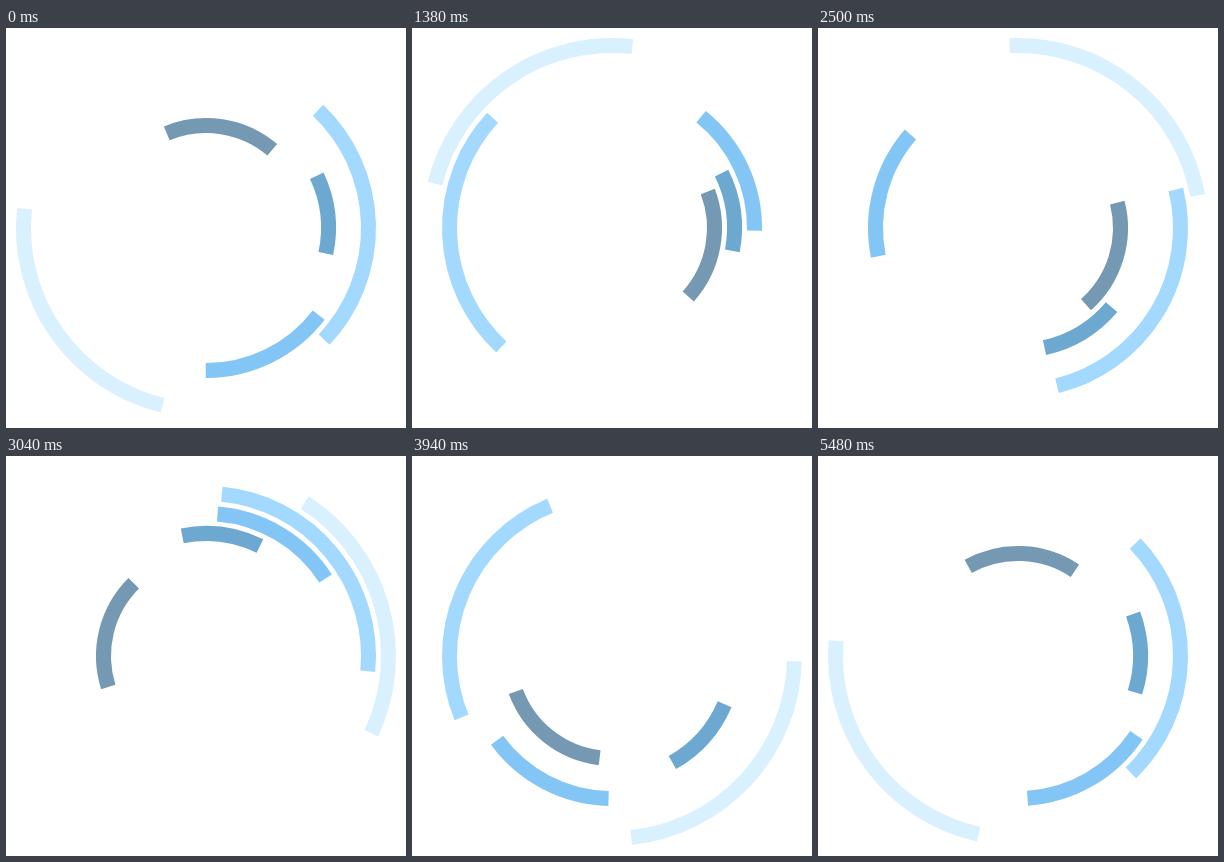
Write an HTML page with a canvas that moves like this. It is 400 px wide and 400 px high and loops after 5500 ms.

```html
<!DOCTYPE html>
<html lang="en">
<head>
<meta charset="utf-8">
<title>Rotating arcs</title>
<style>
  html, body { margin: 0; width: 100%; height: 100%; overflow: hidden; background: #fff; }
  canvas { display: block; }
</style>
</head>
<body>
<canvas width="400" height="400"></canvas>
<script>
const LOOP = 5500;
const ctx = document.querySelector('canvas').getContext('2d');

// Angles in degrees, clockwise from the right; turns per loop are signed.
const rings = [
  { radius: 182.5, from: 103.7,  span: 82.3, turns: 1,  color: '#d9f0ff' },
  { radius: 162.5, from: -46.3,  span: 89.8, turns: -2, color: '#a3d9ff' },
  { radius: 142.5, from: 37.5,   span: 52.4, turns: 3,  color: '#83c5f5' },
  { radius: 122.5, from: -25,    span: 37.3, turns: -4, color: '#6da8d1' },
  { radius: 102.5, from: -112.85, span: 62.8, turns: 5, color: '#7699b3' },
];
const rad = deg => deg * Math.PI / 180;

function draw(time) {
  const progress = time % LOOP / LOOP;
  ctx.clearRect(0, 0, 400, 400);
  ctx.lineWidth = 15;
  for (const { radius, from, span, turns, color } of rings) {
    const start = from + 360 * turns * progress;
    ctx.strokeStyle = color;
    ctx.beginPath();
    ctx.arc(200, 200, radius, rad(start), rad(start + span));
    ctx.stroke();
  }
}

const begin = performance.now();
function tick() {
  draw(performance.now() - begin);
  requestAnimationFrame(tick);
}
tick();
</script>
</body>
</html>
```
